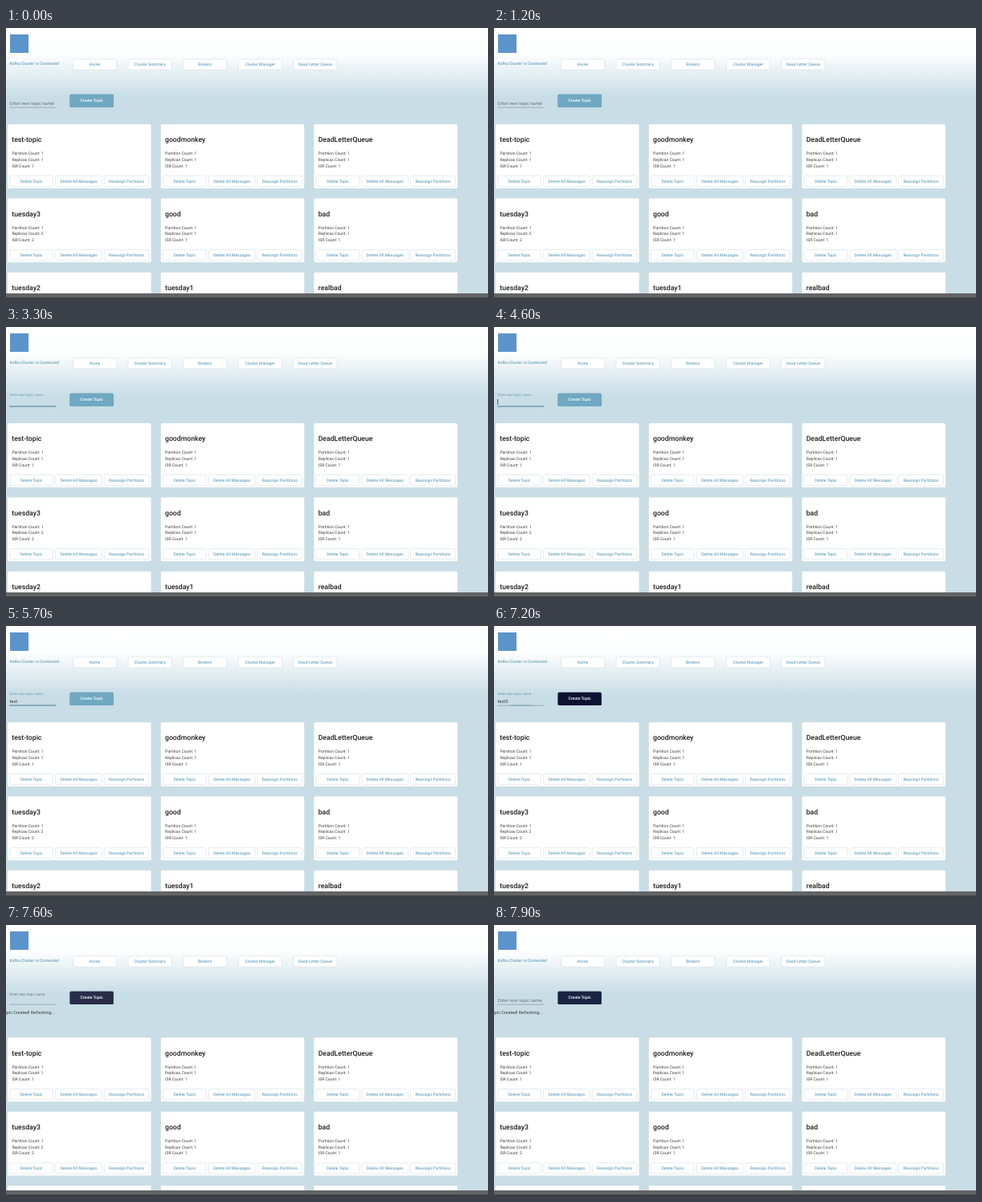
Recreate the animation shown at these times as an HTML page. Size 600x338 px, loop 8 s.

```html
<!DOCTYPE html>
<html lang="en">
<head>
<meta charset="utf-8">
<title>Topic list</title>
<style>
  html, body { margin: 0; width: 100%; height: 100%; overflow: hidden; background: #c8dde5; }
  svg { display: block; width: 600px; height: 338px; }
  text { font-family: Roboto, Arial, sans-serif; font-size: 5.05px; fill: #3c3c3c; text-rendering: geometricPrecision; white-space: pre; }
  .mid { text-anchor: middle; }
  .end { text-anchor: end; font-size: 5.4px; }
  .link { fill: #68a3c1; font-weight: 500; }
  .title { font-size: 8.68px; font-weight: 500; fill: #1c1c1c; }
  .field { font-size: 5.77px; }
  .outline { fill: #fff; stroke: #d3dde2; stroke-width: .6; }
  .card { fill: #fff; filter: drop-shadow(0 .8px .7px rgba(40, 70, 85, .32)); }
  #button { filter: drop-shadow(0 .8px .7px rgba(30, 40, 80, .45)); }
</style>
</head>
<body>
<svg viewBox="0 0 600 338">
  <defs>
    <linearGradient id="sky" x1="0" y1="0" x2="0" y2="1">
      <stop offset="0" stop-color="#fff"/>
      <stop offset=".38" stop-color="#fdfefe"/>
      <stop offset=".6" stop-color="#eaf2f5"/>
      <stop offset="1" stop-color="#c8dde5"/>
    </linearGradient>
    <clipPath id="clip"><rect x="79.5" y="82.8" width="54.3" height="16.2" rx="1.5"/></clipPath>
  </defs>
  <rect width="600" height="338" fill="#c8dde5"/>
  <rect width="600" height="86" fill="url(#sky)"/>
  <rect x="5" y="8" width="23" height="23" fill="#5b94cb"/>
  <text class="link" x="4.6" y="46.4">Kafka Cluster is Connected</text>
  <g id="nav"></g>

  <text id="label" class="field"></text>
  <text id="value" class="field" x="4.4" y="95.5"></text>
  <rect id="caret" x="4.4" y="90" width=".7" height="7" fill="#222"/>
  <rect x="4.3" y="98.8" width="57.7" height=".6" fill="#7d8c92"/>
  <rect id="hover" x="4.3" y="98.5" width="57.7" height="1" fill="#333c41"/>
  <rect id="focus" y="98.5" height="1"/>

  <rect id="button" x="79.5" y="82.8" width="54.3" height="16.2" rx="1.5"/>
  <g clip-path="url(#clip)"><circle id="ripple" cx="113" cy="95" fill="#fff"/></g>
  <text class="mid" x="106.6" y="92.4" style="fill:#fff;font-weight:500">Create Topic</text>

  <text id="loading" class="end" x="15.4" y="111.3">Loading...</text>
  <text id="created" class="end" x="60.8">Topic Created! Refreshing...</text>
  <g id="cards"></g>
  <rect y="331" width="600" height="7" fill="#626466"/>
  <rect y="336.2" width="600" height="1.8" fill="#3b3c3e"/>
</svg>
<script>
const LOOP = 8000, BLINK = 530;
const HOVER_IN = 1800, FOCUS = 2340, BLUR = 7130, REPLY = 7260, RESET = 7500;
const KEYS = [[4800, "t"], [4920, "e"], [5050, "s"], [5150, "t"], [5800, "3"]];
const $ = id => document.getElementById(id);

function add(parent, tag, attrs, text) {
  const node = document.createElementNS("http://www.w3.org/2000/svg", tag);
  for (const name in attrs) node.setAttribute(name, attrs[name]);
  if (text) node.textContent = text;
  parent.append(node);
  return node;
}

function linkButton(parent, x, y, width, height, text) {
  add(parent, "rect", { class: "outline", x, y, width, height, rx: 1.5 });
  add(parent, "text", { class: "link mid", x: x + width / 2, y: y + height / 2 + 1.8 }, text);
}

["Home", "Cluster Summary", "Brokers", "Cluster Manager", "Dead Letter Queue"]
  .forEach((text, i) => linkButton($("nav"), 83.5 + i * 68.6, 38.8, 54, 13.3, text));

const topics = ["test-topic", "goodmonkey", "DeadLetterQueue", "tuesday3", "good", "bad",
  "tuesday2", "tuesday1", "realbad"];
topics.forEach((name, i) => {
  const x = 1.8 + (i % 3) * 190.7, y = 120 + Math.floor(i / 3) * 92.25;
  const card = add($("cards"), "g", { transform: `translate(${x} ${y})` });
  add(card, "rect", { class: "card", width: 179, height: 80.3, rx: 1.5 });
  add(card, "text", { class: "title", x: 5.5, y: 22.4 }, name);
  const copies = name === "tuesday3" ? 2 : 1;
  [["Partition", 1], ["Replicas", copies], ["ISR", copies]].forEach(([what, n], row) =>
    add(card, "text", { x: 5.6, y: 38.4 + row * 7.7 }, `${what} Count: ${n}`));
  linkButton(card, 2.8, 64.4, 54, 13.2, "Delete Topic");
  linkButton(card, 59.8, 64.4, 57.8, 13.2, "Delete All Messages");
  linkButton(card, 120.4, 64.4, 55.8, 13.2, "Reassign Partitions");
});

const clamp = v => Math.max(0, Math.min(1, v));
const ramp = (t, start, span) => clamp((t - start) / span);
const ease = p => 1 - (1 - p) ** 3;
const smooth = p => p * p * (3 - 2 * p);
const mix = (a, b, p) => `rgb(${a.map((v, i) => Math.round(v + (b[i] - v) * p))})`;
const set = (id, attrs) => { for (const name in attrs) $(id).setAttribute(name, attrs[name]); };

function draw(t) {
  const typed = KEYS.filter(key => key[0] <= t);
  const word = t < RESET ? typed.map(key => key[1]).join("") : "";
  $("value").textContent = word;

  // Floating label
  const float = smooth(ramp(t, FOCUS, 400)) - smooth(ramp(t, RESET, 380));
  const tint = ramp(t, FOCUS, 200) - ramp(t, BLUR + 40, 120);
  const scale = 1 - .25 * float;
  $("label").textContent = "Enter new topic name";
  set("label", { transform: `translate(4.4 ${95.5 - 9.2 * float}) scale(${scale})` });
  $("label").style.fill = mix([104, 119, 126], [104, 157, 186], tint);

  // Caret blink restarts with each key
  const since = t - (typed.length ? typed[typed.length - 1][0] : FOCUS);
  const lit = t >= FOCUS && t < BLUR && Math.floor(since / BLINK) % 2 === 0;
  const width = word ? $("value").getComputedTextLength() : 0;
  set("caret", { x: 4.4 + width, opacity: lit ? 1 : 0 });

  // Underlines
  set("hover", { opacity: t < FOCUS + 300 ? ramp(t, HOVER_IN, 300) : 0 });
  const spread = t < BLUR ? .5 + .5 * ease(ramp(t, FOCUS, 300)) : .5;
  set("focus", {
    x: 33.15 - 28.85 * spread, width: 57.7 * spread,
    fill: "#5d92b0", opacity: ramp(t, FOCUS, 100) - ramp(t, BLUR, 170)
  });

  // Button hover and press
  const dark = ramp(t, 6930, 200);
  const lift = ramp(t, 7700, 200) * .12;
  set("button", { fill: mix([111, 168, 194], [14, 18, 50], dark - lift) });
  set("ripple", {
    r: 45 * ease(ramp(t, 7250, 450)),
    opacity: t < 7250 ? 0 : .15 * (1 - ramp(t, 7500, 400))
  });

  // Replies push the cards down
  const both = t >= REPLY && t < RESET;
  set("loading", { opacity: both ? 1 : 0 });
  set("created", { opacity: t >= REPLY ? 1 : 0, y: both ? 125.8 : 111.3 });
  set("cards", { transform: `translate(0 ${t < REPLY ? 0 : both ? 34.6 : 20.2})` });
}

const start = performance.now();
function tick(now) {
  draw(Math.max(0, now - start) % LOOP);
  requestAnimationFrame(tick);
}
draw(0);
requestAnimationFrame(tick);
</script>
</body>
</html>
```
